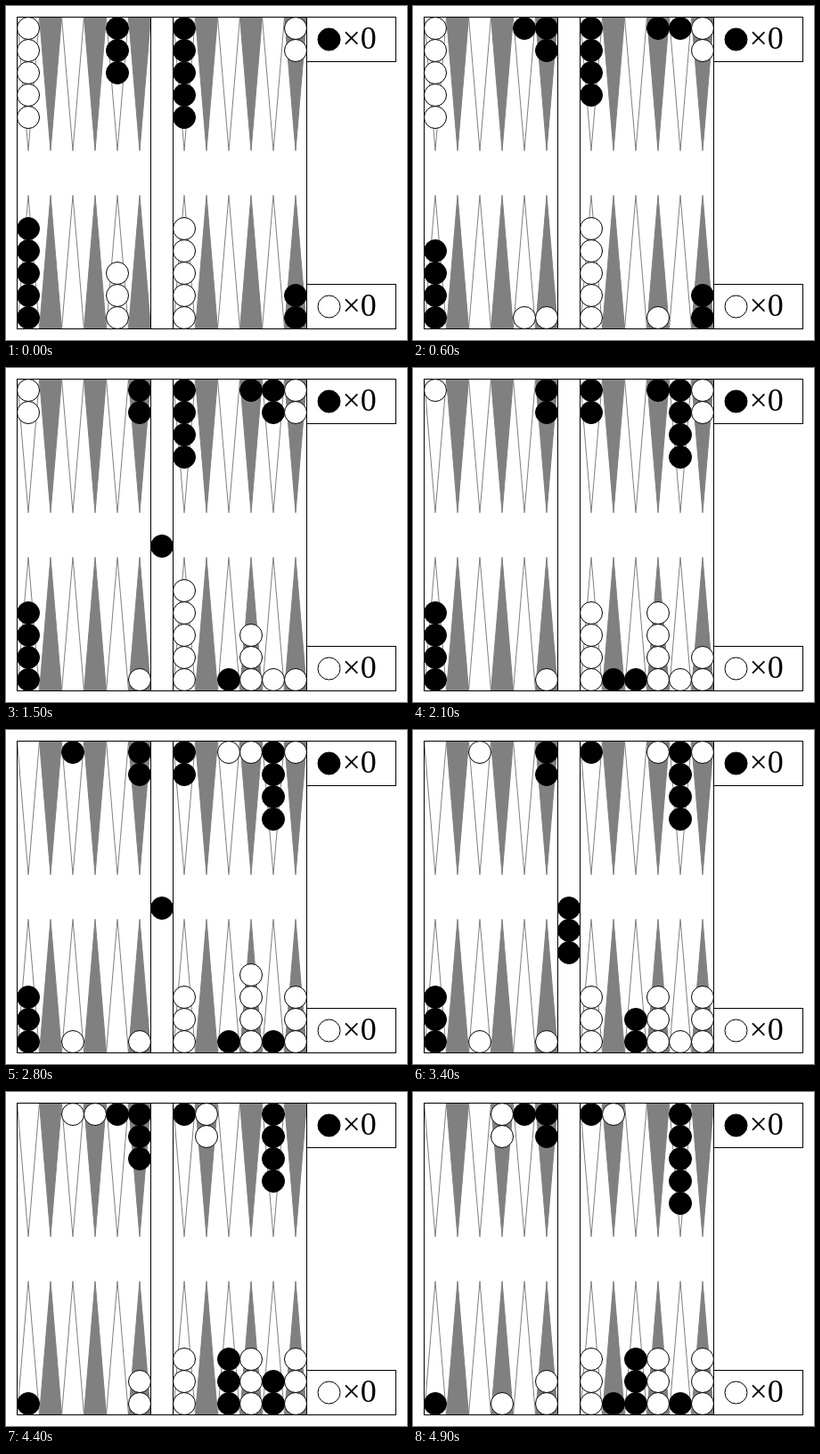
An HTML page with a canvas for the animation above (5 s loop, 450 by 375 pixels).

```html
<!DOCTYPE html>
<html lang="en">
<head>
<meta charset="utf-8">
<title>Backgammon game</title>
<style>
html, body { margin: 0; width: 450px; height: 375px; overflow: hidden; background: #fff; }
canvas { display: block; }
</style>
</head>
<body>
<canvas id="stage" width="450" height="375"></canvas>
<script>
const ctx = document.getElementById('stage').getContext('2d');
const STEP = 100, LOOP = 5000, CELL = 25, EDGE = 12.5;
const BLACK_BAR = 0, WHITE_BAR = 25;

// Points 1-24 from White's side; positive counts are white, negative black.
const START = { 1: -2, 6: 5, 8: 3, 12: -5, 13: 5, 17: -3, 19: -5, 24: 2 };

// One line per turn, one move per step; 0/0 is a pass from the bar.
const MOVES = `
  12/18 17/18
  8/3 8/7
  17/22 19/23
  13/8 13/8 8/3 8/3
  17/23 1/4
  13/7 8/2 7/1 7/1
  0/5 19/23
  13/7 6/3
  19/23 5/10
  13/10 6/1
  0/2 12/15
  25/21 24/22
  0/4 19/22
  25/22 3/2
  0/0
  21/15 10/7
  0/2 0/4
  25/20 24/20
  0/2 12/17
  22/20 20/16
  12/18 18/19
  15/9 20/16
  19/23 2/5`.trim().split(/\s+/).map(move => move.split('/').map(Number));

function boardAfter(count) {
  const board = Array.from({ length: 26 }, (_, p) => START[p] || 0);
  for (const [from, to] of MOVES.slice(0, count)) {
    const side = Math.sign(board[from]);
    board[from] -= side;
    if (board[to] * side < 0) {
      board[to] = 0;
      board[side > 0 ? BLACK_BAR : WHITE_BAR] -= side;
    }
    board[to] += side;
  }
  return board;
}

const columnX = column => CELL * (column + 1);

// First checker position of a point and the direction its stack grows.
function stackAt(point) {
  if (point === BLACK_BAR) return [columnX(6), 200, 1];
  if (point === WHITE_BAR) return [columnX(6), 175, -1];
  const top = point > 12;
  const offset = top ? point - 13 : 12 - point;
  return [columnX(offset + (offset > 5)), top ? 25 : 350, top ? 1 : -1];
}

function checker(x, y, color) {
  ctx.beginPath();
  ctx.arc(x, y, EDGE, 0, 2 * Math.PI);
  ctx.fillStyle = color;
  ctx.fill();
  ctx.stroke();
}

function triangle(x, base, tip, color) {
  ctx.beginPath();
  ctx.moveTo(x - EDGE, base);
  ctx.lineTo(x, tip);
  ctx.lineTo(x + EDGE, base);
  ctx.closePath();
  ctx.fillStyle = color;
  ctx.fill();
  ctx.stroke();
}

function drawTable() {
  ctx.fillStyle = '#fff';
  ctx.fillRect(0, 0, 450, 375);
  ctx.lineWidth = 1;
  ctx.strokeStyle = '#808080';
  for (let point = 1; point <= 24; point++) {
    const [x, , dir] = stackAt(point);
    const base = dir > 0 ? EDGE : 362.5;
    triangle(x, base, base + dir * 150, (point % 2 === 0) === (point > 12) ? '#808080' : '#fff');
  }
  ctx.strokeStyle = '#000';
  ctx.strokeRect(EDGE, EDGE, 325, 350);
  ctx.strokeRect(162.5, EDGE, 25, 350);
  ctx.font = '36px "Liberation Serif", serif';
  for (const [y, color] of [[EDGE, '#000'], [312.5, '#fff']]) {
    ctx.strokeRect(337.5, y, 100, 50);
    checker(362.5, y + 25, color);
    ctx.fillStyle = '#000';
    ctx.fillText('×0', 377.5, y + 35);
  }
}

function draw() {
  drawTable();
  const step = Math.floor(performance.now() % LOOP / STEP);
  boardAfter(step).forEach((count, point) => {
    const [x, y, dir] = stackAt(point);
    for (let i = 0; i < Math.abs(count); i++) {
      checker(x, y + dir * CELL * i, count > 0 ? '#fff' : '#000');
    }
  });
  requestAnimationFrame(draw);
}
draw();
</script>
</body>
</html>
```
